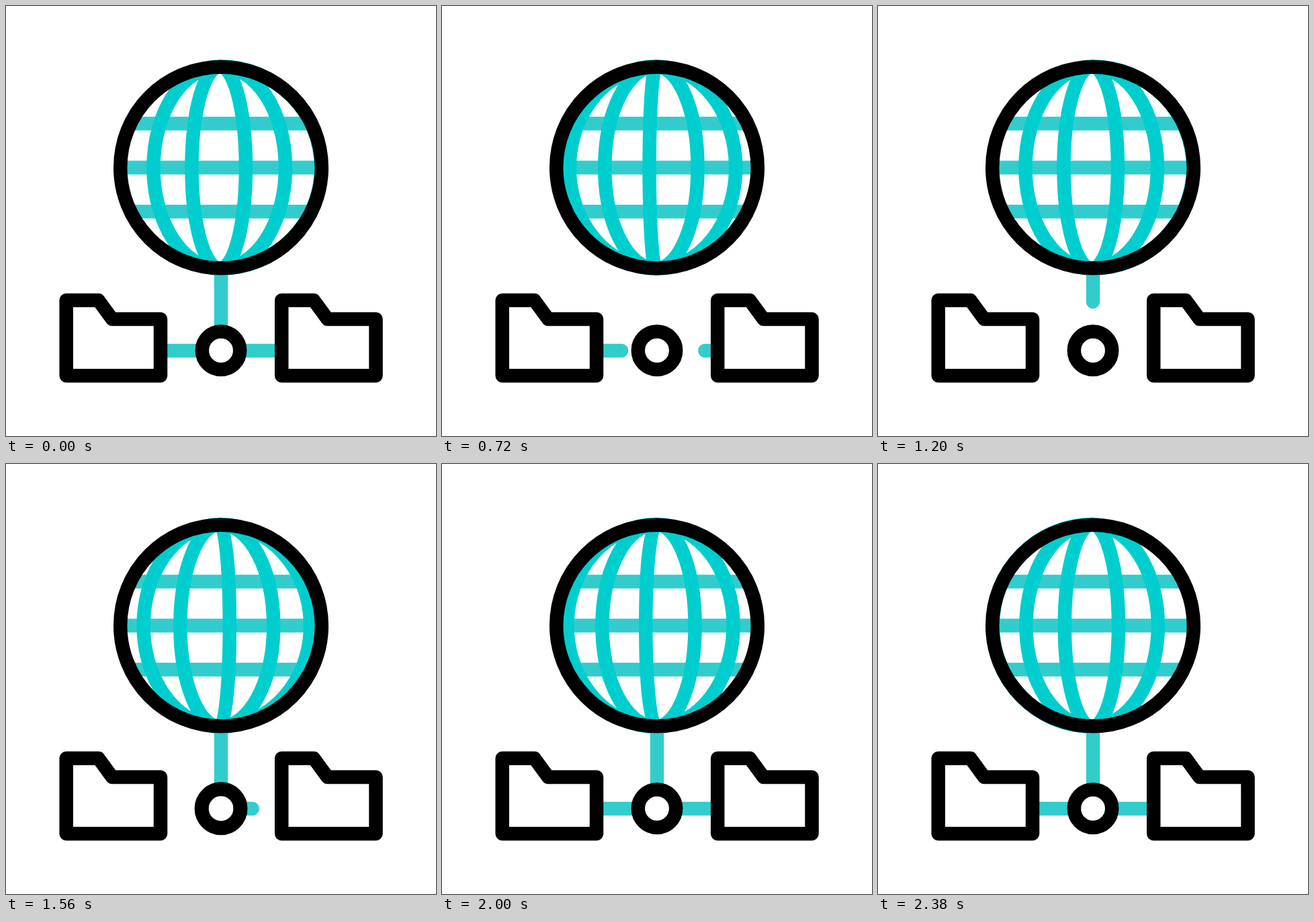
Animation, 640 px wide and 640 px high, one loop 2400 ms. Source, as an HTML page:

```html
<!DOCTYPE html>
<html lang="en">
<head>
<meta charset="utf-8">
<title>Shared network</title>
<style>
  html, body { margin: 0; width: 100%; height: 100%; overflow: hidden; background: #fff; }
  svg { display: block; width: 100%; height: 100%; }
  svg * { fill: none; }
  .ink { stroke: #000; stroke-width: 20.5; stroke-linejoin: round; }
  .wire { stroke: #3cc; stroke-width: 20.5; }

  /* Five meridians share one sweep across the globe, one step apart. */
  .meridians path {
    stroke: #00cece;
    stroke-width: 20.5;
    animation: sweep 6s linear infinite;
    animation-delay: calc(var(--i) * -1.2s);
  }
  @keyframes sweep {
    0%   { d: path("M318.5 90C401.6 90 469 157.4 469 240.5C469 323.6 401.6 391 318.5 391"); }
    20%  { d: path("M318.5 90C372.4 90 416 157.4 416 240.5C416 323.6 372.4 391 318.5 391"); }
    40%  { d: path("M318.5 90C339.8 90 357 157.4 357 240.5C357 323.6 339.8 391 318.5 391"); }
    60%  { d: path("M318.5 90C295.3 90 276.5 157.4 276.5 240.5C276.5 323.6 295.3 391 318.5 391"); }
    80%  { d: path("M318.5 90C263.8 90 219.5 157.4 219.5 240.5C219.5 323.6 263.8 391 318.5 391"); }
    100% { d: path("M318.5 90C236.5 90 170 157.4 170 240.5C170 323.6 236.5 391 318.5 391"); }
  }

  /* Links retract away from the globe, then grow back the same way. */
  .link {
    stroke-linecap: round;
    stroke-dasharray: 1 2;
    animation: branch 2.4s linear infinite;
  }
  .stem { animation-name: stem; }
  .late { animation-delay: -2.34s; }
  @keyframes stem {
    0% { stroke-dashoffset: 0; }
    24.17% { stroke-dashoffset: -1; }
    24.18%, 36.67% { stroke-dashoffset: 1; }
    61.67%, 100% { stroke-dashoffset: 0; }
  }
  @keyframes branch {
    0%, 24.17% { stroke-dashoffset: 0; }
    32.5% { stroke-dashoffset: -1; }
    32.51%, 62.5% { stroke-dashoffset: 1; }
    70.83%, 100% { stroke-dashoffset: 0; }
  }

  .hub {
    transform-origin: 320px 512.8px;
    animation: pulse 2.4s ease-in-out infinite;
  }
  @keyframes pulse {
    0%, 60.5% { transform: scale(1); }
    65% { transform: scale(1.025); }
    70%, 100% { transform: scale(1); }
  }
</style>
</head>
<body>
<svg viewBox="0 0 640 640">
  <defs>
    <path id="folder" d="M89.7 438H137.5L158 466H230V550.3H89.7Z"/>
  </defs>

  <path class="wire" d="M190 175H450M175 240.5H465M190 306H450"/>
  <g class="meridians">
    <path style="--i:0"/>
    <path style="--i:1"/>
    <path style="--i:2"/>
    <path style="--i:3"/>
    <path style="--i:4"/>
  </g>

  <path class="wire link stem" pathLength="1" d="M320 390V484"/>
  <path class="wire link" pathLength="1" d="M348 513H409.5"/>
  <path class="wire link late" pathLength="1" d="M292 513H230.5"/>

  <g class="ink">
    <circle cx="320" cy="240.5" r="149.8"/>
    <circle class="hub" cx="320" cy="512.8" r="28.2"/>
    <use href="#folder"/>
    <use href="#folder" x="320.5"/>
  </g>
</svg>
</body>
</html>
```
